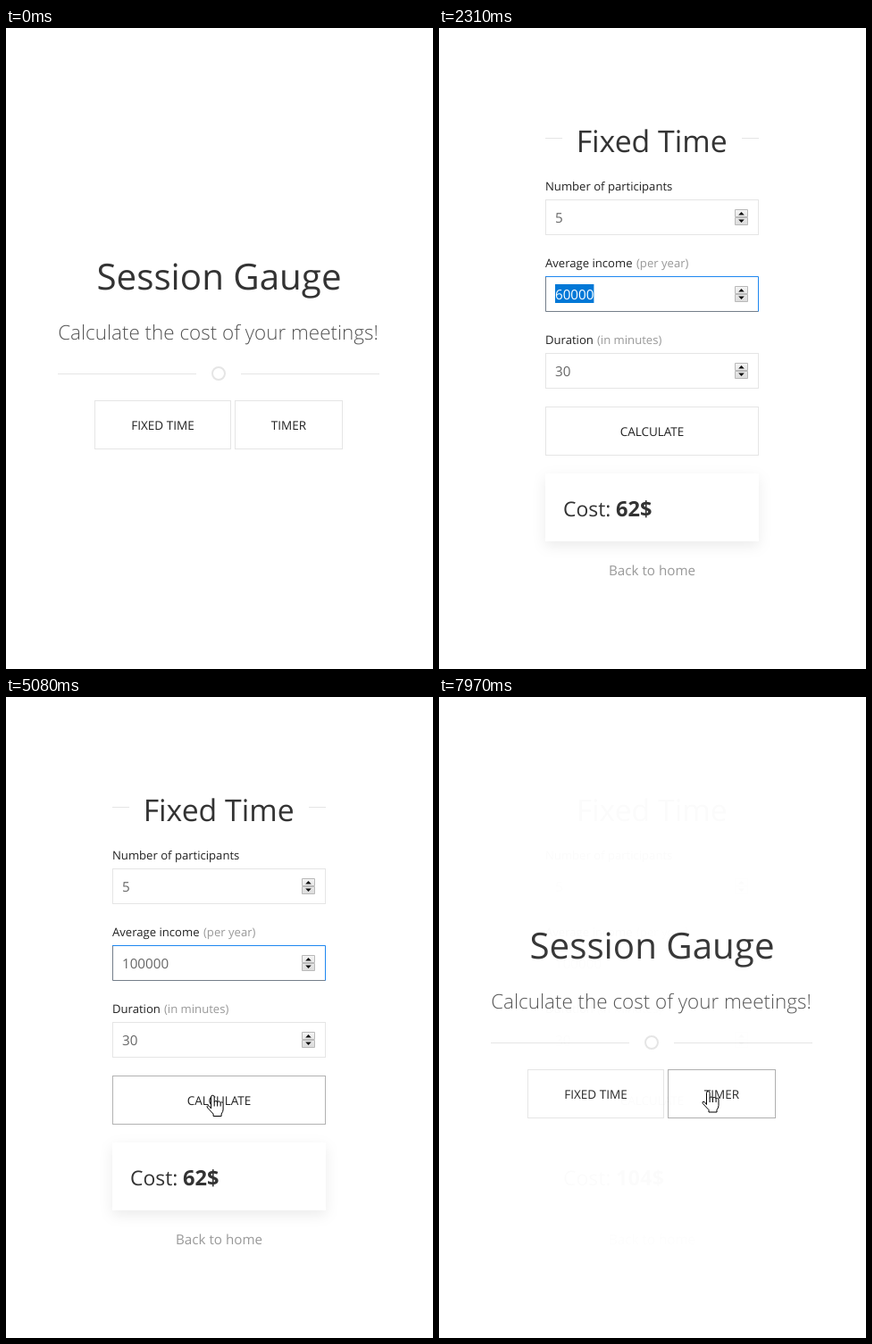
An HTML page that plays this animation: 478x718 px, repeating every 8000 ms.

```html
<!DOCTYPE html>
<html lang="en">
<head>
<meta charset="utf-8">
<title>Session Gauge</title>
<style>
  html, body { margin: 0; width: 100%; height: 100%; overflow: hidden; background: #fff; }
  svg { display: block; font-family: "Open Sans", "Noto Sans", sans-serif; fill: #333; text-rendering: geometricPrecision; }
  .mid { text-anchor: middle; }
  .box { fill: #fff; stroke: #e5e5e5; }
  .rule { fill: #e5e5e5; }
  .button { font-size: 13.5px; fill: #222; text-anchor: middle; }
  .label { font-size: 13.1px; fill: #222; }
  .muted { fill: #999; }
  .value { font-size: 15.2px; fill: #666; white-space: pre; }
  .card { fill: #fff; filter: drop-shadow(0 5px 7.5px rgba(0, 0, 0, .08)); }
  .pointer { fill: #fff; stroke: #000; stroke-linejoin: round; }
</style>
</head>
<body>
<svg width="478" height="718" viewBox="0 0 478 718">
  <defs>
    <linearGradient id="bevel" x2="0" y2="1">
      <stop offset="0" stop-color="#f4f4f4"/><stop offset="1" stop-color="#dcdcdc"/>
    </linearGradient>
    <g id="spinner">
      <path d="M.5 .5h14v8h-14zM.5 9.5h14v8h-14z" fill="url(#bevel)" stroke="#b9b9b9"/>
      <path d="M4.2 6.5h6.6L7.5 3zM4.2 11.5h6.6L7.5 15z" fill="#111"/>
    </g>
  </defs>

  <g id="home">
    <text class="mid" x="238.5" y="293" font-size="40.3">Session Gauge</text>
    <text class="mid" x="237.5" y="349" font-size="22.45" font-weight="300" fill="#555">Calculate the cost of your meetings!</text>
    <path class="rule" d="M58 387h155v1H58zM263 387h155v1H263z"/>
    <circle cx="238" cy="387" r="7" fill="none" stroke="#e5e5e5" stroke-width="2"/>
    <rect id="fixedButton" class="box" x="99.5" y="417.5" width="152" height="54"/>
    <text class="button" x="175.5" y="450">FIXED TIME</text>
    <rect id="timerButton" class="box" x="256.5" y="417.5" width="120" height="54"/>
    <text class="button" x="316.5" y="450">TIMER</text>
  </g>

  <g id="form">
    <path class="rule" d="M119 123h19v1h-19zM339 123h19v1h-19z"/>
    <text class="mid" x="238.2" y="139" font-size="33.8">Fixed Time</text>

    <text class="label" x="119" y="182">Number of participants</text>
    <rect class="box" x="119.5" y="192.5" width="238" height="39"/>
    <text class="value" x="130" y="218">5</text>
    <use href="#spinner" x="331" y="203"/>

    <text class="label" x="119" y="268">Average income</text>
    <text class="label muted" x="221" y="268">(per year)</text>
    <rect class="box" x="119.5" y="278.5" width="238" height="39"/>
    <g id="focus" fill="none">
      <path d="M119.5 278v39.5h238" stroke="#747e8a"/>
      <path d="M119 278.5h238.5v39" stroke="#1e87f0"/>
    </g>
    <rect id="selection" y="287" height="21" fill="#0078d7"/>
    <text class="value" x="130" y="304"><tspan id="plain"></tspan><tspan id="picked" fill="#fff"></tspan></text>
    <rect id="caret" y="287" width="1" height="21" fill="#333"/>
    <use href="#spinner" x="331" y="289"/>

    <text class="label" x="119" y="354">Duration</text>
    <text class="label muted" x="177" y="354">(in minutes)</text>
    <rect class="box" x="119.5" y="364.5" width="238" height="39"/>
    <text class="value" x="130" y="390">30</text>
    <use href="#spinner" x="331" y="375"/>

    <rect id="calcButton" class="box" x="119.5" y="424.5" width="238" height="54"/>
    <text class="button" x="238.5" y="457">CALCULATE</text>

    <rect class="card" x="119" y="499" width="239" height="76"/>
    <text x="139" y="547" font-size="22.9">Cost:</text>
    <text id="cost" x="198" y="547" font-size="23.6" font-weight="700"></text>
    <text id="back" class="mid" x="238.5" y="613" font-size="15.2">Back to home</text>
    <rect id="underline" x="190" y="615" width="97" height="1" fill="#666"/>
  </g>

  <g id="cursor">
    <path id="arrow" class="pointer" d="M.5 .5v16l3.7-3.6 2.4 5.7 2.6-1.1-2.4-5.6h5z"/>
    <g id="hand" class="pointer">
      <path d="M-1.5 15V2a1.8 1.8 0 0 1 3.6 0V8q0-1.5 1.6-1.5t1.8 1.6q.3-1.2 1.8-1.2t1.8 1.6q.4-.8 1.4-.7 1.5.2 1.5 1.8V16q0 2.5-2 5v2.5H1V21L-5.6 14q-1-1.6 .4-2.4Q-4 11-1.5 15z"/>
      <path d="M2.1 8v4.5M5.5 8v4.5M9.1 8.5v4" fill="none"/>
    </g>
    <path id="beam" d="M-3 -7.5h2.5q.5 0 .5.5 0-.5.5-.5H3M0-7V7M-3 7.5h2.5q.5 0 .5-.5 0 .5.5.5H3" transform="translate(.5 0)" fill="none" stroke="#000"/>
  </g>
</svg>

<script>
const LOOP = 8000;
const DIGIT = 8.68, TEXT_X = 130;
const el = {};
document.querySelectorAll('svg [id]').forEach(node => el[node.id] = node);

const clamp = (v, lo = 0, hi = 1) => Math.min(hi, Math.max(lo, v));
const ramp = (t, start, length) => clamp((t - start) / length);
const smooth = p => p * p * (3 - 2 * p);
const easeOut = p => 1 - (1 - p) * (1 - p);
const during = (t, a, b) => t >= a && t < b;
const inside = (p, x, y, w, h) => p.x >= x && p.x < x + w && p.y >= y && p.y < y + h;
const show = (node, visible) => node.setAttribute('visibility', visible ? 'visible' : 'hidden');
const grey = v => `rgb(${v},${v},${v})`;

// Mouse strokes: start, end, from, to, easing
const strokes = [
  [100, 880, [386, 712], [171.5, 440.5], easeOut],
  [1230, 1700, [171.5, 440.5], [172, 312], smooth],
  [1740, 2310, [172, 312], [8, 332], smooth],
  [4340, 5130, [8, 326], [232, 446.5], easeOut],
  [6190, 6780, [232, 446.5], [240.5, 613.5], smooth],
  [7430, 7940, [240.5, 613.5], [301, 441.5], smooth]
];
const keystrokes = [[2870, '1'], [2910, '10'], [3100, '100'], [3240, '1000'], [3380, '10000'], [3570, '100000']];

function mouseAt(t) {
  const [start, end, from, to, ease] = strokes.findLast(s => t >= s[0]) || strokes[0];
  const p = ease(ramp(t, start, end - start));
  return { x: from[0] + (to[0] - from[0]) * p, y: from[1] + (to[1] - from[1]) * p };
}

function drawIncome(t, mouse) {
  const typed = keystrokes.findLast(k => t >= k[0]);
  const text = typed ? typed[1] : '60000';
  let from = text.length;
  if (during(t, 1780, 2870)) from = Math.round(clamp((mouse.x - TEXT_X) / DIGIT, 0, 5));
  el.plain.textContent = text.slice(0, from);
  el.picked.textContent = text.slice(from);
  el.selection.setAttribute('x', TEXT_X + from * DIGIT);
  el.selection.setAttribute('width', (text.length - from) * DIGIT);
  el.caret.setAttribute('x', Math.round(TEXT_X + text.length * DIGIT));
  show(el.caret, during(t, 2870, 3620) || during(t, 4180, 4680));
  el.focus.setAttribute('opacity', ramp(t, 1780, 200) - ramp(t, 5220, 200));
}

function drawCursor(t, mouse, overButton, overInput) {
  const dragging = during(t, 1740, 2870);
  const kind = dragging || overInput ? 'beam' : overButton ? 'hand' : 'arrow';
  const visible = during(t, 120, 2290) || t >= 4370;
  for (const name of ['arrow', 'hand', 'beam']) show(el[name], visible && name === kind);
  el.cursor.setAttribute('transform', `translate(${mouse.x.toFixed(1)} ${mouse.y.toFixed(1)})`);
}

function draw(t) {
  const mouse = mouseAt(t);
  const formShown = during(t, 1030, 7400);
  const formOpacity = smooth(ramp(t, 1030, 620)) - smooth(ramp(t, 7400, 620));
  el.form.setAttribute('opacity', formOpacity);
  el.home.setAttribute('opacity', 1 - formOpacity);

  const overFixed = !formShown && inside(mouse, 99, 417, 153, 55);
  const overTimer = !formShown && inside(mouse, 256, 417, 121, 55);
  const overCalc = formShown && inside(mouse, 119, 424, 239, 55);
  const overBack = formShown && inside(mouse, 190, 597, 97, 24);
  const overInput = formShown && [192, 278, 364].some(y => inside(mouse, 119, y, 239, 40));

  const leaving = during(t, 1030, 2000);
  el.fixedButton.style.stroke = grey(overFixed || leaving ? 174 : 229);
  el.timerButton.style.stroke = grey(overTimer ? 174 : 229);
  const calcHeld = overCalc ? 1 : t >= 5130 ? 1 - ramp(t, 7060, 190) : 0;
  el.calcButton.style.stroke = grey(Math.round(229 - 51 * calcHeld));

  drawIncome(t, mouse);
  el.cost.textContent = t < 5500 ? '62$' : '104$';
  el.back.style.fill = overBack ? '#666' : '#999';
  show(el.underline, overBack);
  drawCursor(t, mouse, overFixed || overTimer || overCalc || overBack, overInput);
}

const begin = performance.now();
function tick() {
  draw((performance.now() - begin) % LOOP);
  requestAnimationFrame(tick);
}
tick();
</script>
</body>
</html>
```
